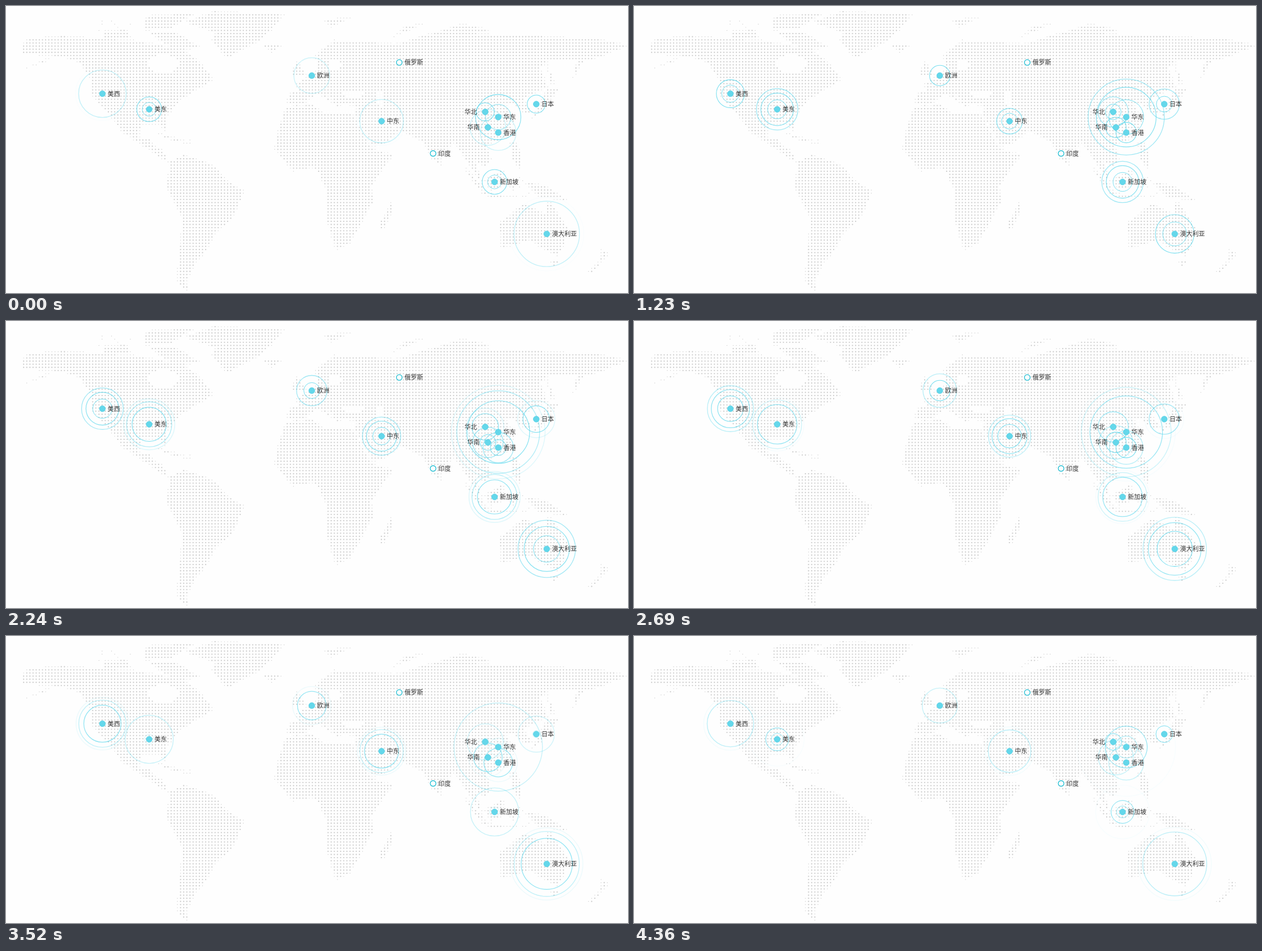
An HTML page for the animation above (4.6 s loop, 1100 px wide and 509 px high).

```html
<!DOCTYPE html>
<html lang="zh">
<head>
<meta charset="utf-8">
<title>节点分布</title>
<style>
html, body { margin: 0; width: 100%; height: 100%; overflow: hidden; background: #fefefe; }
svg { display: block; width: 100vw; height: 100vh; }
text { font: 11px "Noto Sans CJK SC", "Noto Sans CJK", sans-serif; fill: #333; }
.land path { fill: none; stroke: #cdcdcd; stroke-linecap: round; }
.rings circle { fill: none; stroke: #4fd5ec; }
</style>
</head>
<body>
<svg id="stage" viewBox="0 0 1100 509"></svg>
<script>
const svg = document.getElementById('stage');

function add(parent, name, attrs = {}) {
  const el = document.createElementNS('http://www.w3.org/2000/svg', name);
  for (const key in attrs) el.setAttribute(key, attrs[key]);
  return parent.appendChild(el);
}

// Key points of the coastlines; a regular grid of dots fills them.
const coasts = {
  northAmerica: `M28 70 38 59 100 54 225 62 310 76 340 98 366 130 333 150 308 165 282 198 284 224
    272 208 238 208 234 237 253 236 264 250 277 256 286 277 262 260 208 224 188 198 154 160 150 128
    130 99 100 89 28 84Z M36 110 74 93 74 97Z`,
  arctic: `M248 18 330 14 292 38 246 38Z M252 45 302 49 342 72 300 80Z M174 44 214 43 220 58 176 58Z
    M318 29 368 10 490 16 470 41 446 62 392 91 364 62 373 48Z M456 70 487 70 470 81Z`,
  southAmerica: `M292 276 316 264 370 285 390 311 421 328 400 376 372 400 350 438 335 455 318 490
    322 505 303 490 313 375 284 321Z M266 226 300 234 318 242 300 240Z`,
  africa: `M496 181 542 175 561 191 613 192 646 253 683 264 645 320 649 346 608 420 584 431 566 375
    568 330 554 296 545 286 508 292 476 253 482 220Z M659 391 680 351 683 365 668 395Z`,
  eurasia: `M548 86 580 62 636 64 690 68 750 50 806 32 852 42 830 50 960 55 1050 60 1099 70 1050 90
    1020 98 1004 125 1012 94 962 95 944 109 956 142 914 165 930 190 918 191 894 170 884 177 899 200
    886 232 848 246 858 272 848 284 828 272 842 314 808 264 792 240 770 263 768 281 752 268 740 242
    672 208 696 222 672 242 648 249 618 192 622 178 594 172 588 181 566 152 574 170 552 154 527 172
    512 178 499 172 500 155 520 152 512 140 551 114Z`,
  northIslands: `M505 122 513 98 531 122Z M690 52 704 38 732 33Z M564 25 608 21 576 36Z
    M958 108 970 136 963 136Z M959 145 976 148 946 187 932 196Z`,
  southIslands: `M810 284 846 326 834 322Z M848 308 878 291 882 316 856 326Z M842 331 882 337 860 339Z
    M889 308 906 306 896 328Z M892 242 902 242 910 264 908 288 896 270Z M918 313 952 319 992 344 942 338Z`,
  oceania: `M874 385 916 351 954 370 960 346 992 394 985 428 974 442 944 426 926 414 876 429Z
    M964 453 976 453 970 462Z M1053 431 1064 440 1036 473 1031 470 1052 452Z`
};
// Ellipses: x, y, x radius, y radius
const seas = [[278, 102, 27, 16], [335, 88, 9, 5], [581, 104, 11, 10], [614, 155, 20, 6], [662, 165, 7, 13]];
const archipelagos = [[195, 36, 45, 12], [325, 238, 18, 6], [905, 325, 30, 18]];

const within = (x, y) => ([cx, cy, rx, ry]) => ((x - cx) / rx) ** 2 + ((y - cy) / ry) ** 2 < 1;

let seed = 7;
const random = () => (seed = seed * 16807 % 2147483647) / 2147483647;

function drawLand() {
  const pen = document.createElement('canvas').getContext('2d');
  pen.lineWidth = 4;
  const shapes = Object.values(coasts).map(d => new Path2D(d));
  const pitch = 5.55;
  let full = '', edge = '';
  for (let y = 10.1; y < 508; y += pitch) {
    for (let x = 25.65; x < 1100; x += pitch) {
      const dot = `M${x.toFixed(2)} ${y.toFixed(2)}h.01`;
      const inEllipse = within(x, y);
      if (seas.some(inEllipse)) continue;
      if (shapes.some(s => pen.isPointInPath(s, x, y))) full += dot;
      else if (shapes.some(s => pen.isPointInStroke(s, x, y))) edge += dot;
      else if (archipelagos.some(inEllipse) && random() < .25) edge += dot;
    }
  }
  const land = add(svg, 'g', { class: 'land' });
  add(land, 'path', { d: full, 'stroke-width': 2.3 });
  add(land, 'path', { d: edge, 'stroke-width': 1.4 });
}

// name, x, y, largest ring radius, age of the first ring at the start
const LIFE = 4480, EARLY = 1620, LATE = 600;
const cities = [
  ['美西', 170.5, 155.5, 48, LATE],
  ['美东', 253.2, 183.2, 48, EARLY],
  ['欧洲', 540.8, 123.4, 35, LATE],
  ['中东', 664.2, 204.2, 44, LATE],
  ['俄罗斯', 695.5, 100.2],
  ['印度', 755.3, 261.5],
  ['华北', 847.5, 187.8, 35, EARLY],
  ['华东', 870.5, 197, 88, EARLY],
  ['华南', 852.2, 215.3, 35, LATE],
  ['香港', 870.5, 224.5, 35, LATE],
  ['日本', 937.8, 174, 35, EARLY],
  ['新加坡', 864, 312, 48, EARLY],
  ['澳大利亚', 956.3, 404.2, 66, LATE]
];
const labelsLeft = ['华北', '华南'];

drawLand();
const ringLayer = add(svg, 'g', { class: 'rings' });
const rings = [];

function addRings(cx, cy, size, age) {
  const count = size > 40 ? 3 : 2;
  for (let i = 0; i < count; i++) {
    const delay = i * (count === 2 ? 1450 : 590 + 110 * i);
    rings.push({ el: add(ringLayer, 'circle', { cx, cy }), size, age: age - delay + LIFE });
  }
}

for (const [name, cx, cy, size, age] of cities) {
  if (size) addRings(cx, cy, size, age);
  add(svg, 'circle', size
    ? { cx, cy, r: 5.3, fill: '#64d7ea', stroke: '#4dcfe5', 'stroke-width': .7 }
    : { cx, cy, r: 5, fill: '#fefefe', stroke: '#20bfd4', 'stroke-width': 1.3 });
  const shift = labelsLeft.includes(name) ? -36.5 : 9.3;
  add(svg, 'text', { x: cx + shift, y: cy + 4 }).textContent = name;
}

const growth = x => x + .68 * x ** 1.5 * (1 - x);
const fadeIn = g => Math.min(1, Math.max(0, (g - .16) / .07));
const opacity = g => .82 * fadeIn(g) * (1 - g ** 4);

function render(t) {
  for (const { el, size, age } of rings) {
    const g = growth((age + t) % LIFE / LIFE);
    el.setAttribute('r', size * g);
    el.setAttribute('stroke-width', .6 + .9 * g);
    el.setAttribute('opacity', opacity(g));
  }
}

// The rings advance in 22 held steps per loop.
const LOOP = 4600, STEPS = 22;
const start = performance.now();
function tick() {
  const t = (performance.now() - start) % LOOP;
  const step = Math.min(STEPS - 1, Math.floor((t + 65) * STEPS / LOOP));
  render(step * 207.6);
  requestAnimationFrame(tick);
}
tick();
</script>
</body>
</html>
```
